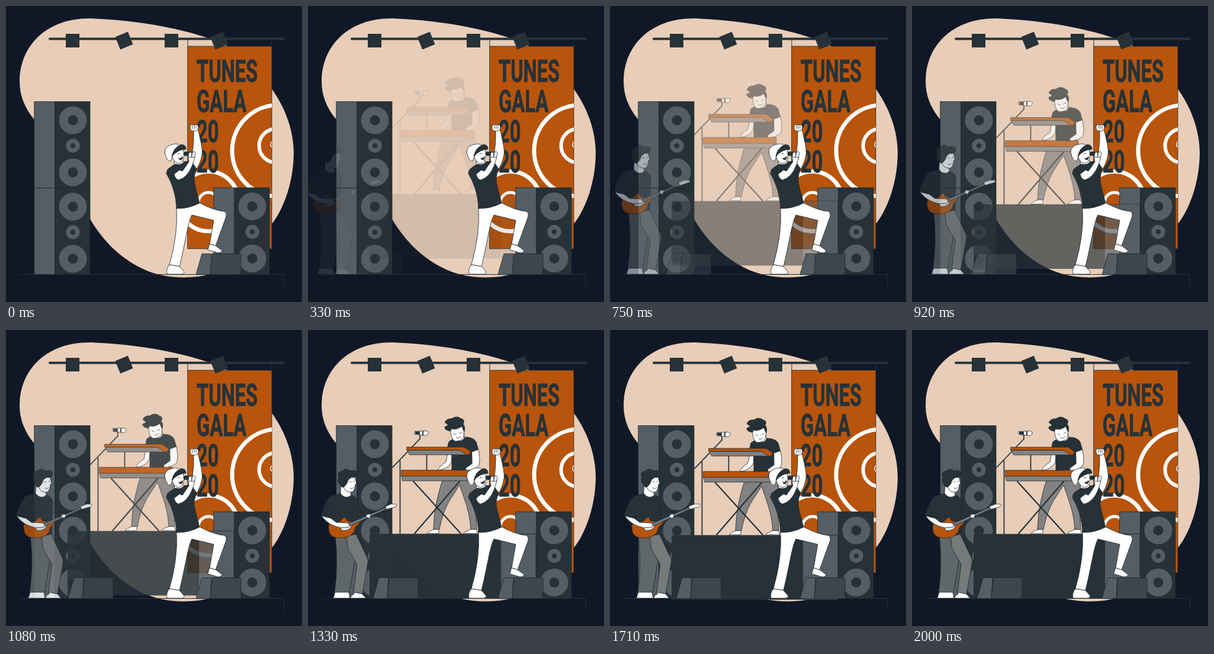
Animation, 500 px wide and 500 px high, one loop 2040 ms. Source, as an HTML page:

```html
<!DOCTYPE html>
<html lang="en">
<head>
<meta charset="utf-8">
<title>Stage</title>
<style>
html, body { margin: 0; width: 100%; height: 100%; overflow: hidden; background: #101827; }
svg { display: block; width: 100vw; height: 100vh; }
.dark { fill: #263238; }
.side { fill: #545e64; }
.front { fill: #3c464c; }
.slab { fill: #828282; }
.orange { fill: #b8540b; }
.white { fill: #fff; }
.edge { stroke: #1b262c; stroke-width: .8; stroke-linejoin: round; stroke-linecap: round; }
.line { fill: none; stroke: #263238; stroke-linecap: round; }
.ring { fill: none; stroke: #fff; }
.poster { font: 700 51px Roboto, "Liberation Sans", sans-serif; fill: #263238; stroke: #263238; stroke-width: .8; }
</style>
</head>
<body>
<svg viewBox="0 0 500 500">
  <defs>
    <clipPath id="bannerClip"><path d="M307 68H449V410H307Z"/></clipPath>
    <g id="box">
      <path class="side edge" d="M0 0H35V146H0Z"/>
      <path class="dark edge" d="M35 0H94V146H35Z"/>
      <g fill="none" stroke="#545e64">
        <circle cx="65" cy="31.500" r="16" stroke-width="15"/>
        <circle cx="65" cy="74.500" r="8" stroke-width="7.500"/>
        <circle cx="65" cy="119.500" r="16" stroke-width="15"/>
      </g>
    </g>
    <g id="monitor" class="edge">
      <path class="side" d="M0 36L10 1H26L24 36Z"/>
      <path class="front" d="M24 36L27 1H76V36Z"/>
    </g>
  </defs>

  <path fill="#e8cdb8" d="M23 128C23 62 76 16 152 21.500C230 25 298 39 350 57C400 76 430 108 449 140C473 174 486 212 486 248C486 298 468 345 449 368C420 402 378 450 325 457C290 461 255 457 225 441C185 420 160 390 142 360C100 270 85 230 48 192C31 172 23 150 23 128Z"/>
  <path class="line" d="M24 453.500H469V474"/>

  <!-- banner -->
  <path class="line" d="M307 56V68M449 56V68"/>
  <path class="orange edge" d="M307 68H449V410H307Z"/>
  <g class="ring" clip-path="url(#bannerClip)">
    <circle cx="459" cy="244.500" r="77" stroke-width="7"/>
    <circle cx="456" cy="236" r="28.500" stroke-width="6"/>
    <circle cx="453" cy="234" r="6" stroke-width="1.500"/>
    <circle cx="342" cy="330" r="50.500" stroke-width="7"/>
    <circle cx="342" cy="332" r="17" stroke-width="5"/>
  </g>
  <g class="poster" transform="translate(322 128) scale(.64 1)">
    <text>TUNES</text>
    <text y="51">GALA</text>
    <text y="102">20</text>
    <text y="153">20</text>
  </g>

  <!-- lights -->
  <path class="line" stroke-width="4" d="M74 55.500H469"/>
  <g class="dark">
    <path d="M101 47h23v23h-23zM268 47h23v23h-23z"/>
    <path d="M-11.500 -11.500h23v23h-23z" transform="translate(199.500 58.500) rotate(-22)"/>
    <path d="M-11.500 -11.500h23v23h-23z" transform="translate(360 58.500) rotate(-22)"/>
  </g>

  <use href="#box" x="48" y="161.500"/>
  <use href="#box" x="48" y="307.500"/>
  <use href="#box" x="351" y="307"/>

  <!-- riser, keyboard player -->
  <g id="riser">
    <path class="side edge" d="M326 344.500H385V453.500H326Z"/>
    <path class="dark" d="M104 344.500H326V453.500H104Z"/>
    <path class="line" stroke-width="1.800" d="M155.500 221V344M143 232L189 184V177"/>
    <path class="white edge" d="M181 171.500L199 170.500Q204 171 203 174.500Q202 179 198 178.500L181 176.500Q177 174 181 171.500Z"/>
    <path class="dark" d="M181 172l8 -.5v5.500l-8 -1zM193 171h2v7h-2z"/>

    <g class="edge">
      <path class="slab" d="M232 240L278 236Q288 265 283 296L285 337H275Q274 312 263 282L256 262L238 290Q227 310 222 337H212Q213 290 232 240Z"/>
      <path class="white" d="M213 337H221V344H201Q202 341 213 337ZM275 337H284L287 344H262Q264 341 275 337Z"/>
      <path class="white" d="M245 176L263 172L265 188L253 194L245 187Z"/>
      <path class="dark" d="M238 189Q247 181 252 187Q261 190 265 181Q279 181 284 189L288 203L278 207V238H243V212L234 208Z"/>
      <path class="white" d="M243 209L242 224Q235 236 219 237Q222 230 233 223L236 208Z"/>
      <path class="white" d="M277 206L288 202Q292 222 288 230Q280 237 266 238L267 233L277 226Z"/>
      <path class="white" d="M241 166Q240 184 248 188Q259 189 263 180L264 162L247 158Z"/>
      <path class="dark" d="M240 171Q230 169 231 164L237 161L231 156Q235 149 243 150Q251 144 259 150Q266 152 262 159Q266 164 264 172Q261 168 260 163Q249 170 243 167Z"/>
      <path class="line" d="M246 175l4 2M256 175l4 -2M251 182q4 2 7 -2"/>
    </g>
    <path class="line" stroke-width="2.200" d="M178 256L258 344M256 256L180 344"/>
    <path class="line" stroke-width="1.800" d="M200.500 211V237M263 211V237"/>
    <g class="edge">
      <path class="slab" d="M158 246H280L270 255H160Z"/>
      <path class="orange" d="M158 237H281V247H158Z"/>
      <path class="slab" d="M168 203H257L269 211H172Z"/>
      <path class="orange" d="M167 198H264L275 206L272 211H268L256 203H167Z"/>
    </g>
  </g>

  <!-- guitarist -->
  <g id="guitarist">
    <use href="#monitor" x="110" y="417.500"/>
    <g class="edge">
      <path fill="#60676b" d="M46 345H72L79 390L70 444H45Q52 395 46 345Z"/>
      <path fill="#777a7b" d="M65 346L81 344L98 380Q103 387 101 396L92 446L77 443L83 396L68 370Z"/>
      <path class="white" d="M46 443H69L71 453H43ZM78 443L92 446L98 453H72Q72 449 78 446Z"/>
      <path class="white" d="M56 262L71 265L73 282Q63 288 55 279Z"/>
      <path class="dark" d="M22 313Q30 288 38 281L55 276Q63 287 74 279Q82 281 84 291L82 345Q61 350 45 345L42 318Z"/>
      <path class="white" d="M58 254Q59 270 67 273Q77 277 79 267L80 261L82 259L79 247L66 246Z"/>
      <path class="dark" d="M62 264Q58 268 55 262Q49 257 52 249Q48 240 58 238Q65 232 71 238Q83 235 84 243Q83 250 74 249Q67 252 66 259Z"/>
      <path class="line" d="M70 256l3 1M77 256l2 0M71 267q4 2 6 -1"/>
      <path class="orange" d="M35 336Q33 325 44 325Q54 326 59 318Q66 314 65 321Q72 326 83 321Q91 319 86 328Q78 333 78 341Q70 353 52 351Q36 351 35 336Z"/>
      <path fill="#e5e2df" d="M54 333Q66 325 74 331Q70 340 58 339Z"/>
      <path class="white" d="M23 314L39 318L48 325L68 326Q74 329 69 333L55 334Q34 330 23 314Z"/>
      <path fill="#737b80" d="M69 327L133 299L134 302L71 331Z"/>
      <path class="white" d="M98 314Q101 309 107 312L104 318Q99 318 98 314Z"/>
      <path class="white" d="M131 298L141 294L149 294Q153 297 147 299L133 303Z"/>
    </g>
  </g>

  <!-- singer -->
  <use href="#monitor" x="321" y="417.500"/>
  <g class="edge">
    <path class="white" d="M288 341L326 332Q352 346 369 347Q374 350 371 358L354 405L344 402L351 362L314 353C307 366 303 400 293 440L276 437Q291 385 288 341Z"/>
    <path class="white" d="M276 437L293 440L301 449Q301 453 296 453H272Q270 444 276 437ZM344 402L354 405L365 413Q364 417 358 417L341 412Z"/>
    <path class="white" d="M308 270Q318 251 317 209L324 208Q333 242 331 251Q329 266 319 280Z"/>
    <path class="white" d="M311 203Q312 199 317 201Q324 199 325 204Q325 210 321 211H314Q310 208 311 203Z"/>
    <path class="line" d="M315 202v5M318 202v5M321 202v5"/>
    <path class="white" d="M284 259L300 262L301 272L286 276Z"/>
    <path class="dark" d="M273 276Q281 269 287 267Q295 270 301 263L313 262L322 275Q315 291 320 306L327 333Q307 343 288 342Q287 310 271 283Z"/>
    <path class="white" d="M280 251Q281 263 291 266Q299 265 300 256L301 250L298 240L285 243Z"/>
    <path class="white" d="M268 247Q268 237 280 234Q290 231 295 236L283 250L278 262Q272 264 268 247Z"/>
    <path class="dark" d="M280 254Q283 239 296 234Q304 234 304 242Q291 242 280 254Z"/>
    <path class="dark" d="M292 257Q296 258 298 254Q299 260 294 260Z"/>
    <path class="line" d="M290 250q2 -2 4 0"/>
    <path class="white" d="M284 284L293 277L298 279L309 263L307 252L314 247L319 255L315 268Q307 290 291 294Q285 291 284 284Z"/>
    <path class="dark" d="M300 250Q300 245 306 246.500L318 247V250L306 252.500Q301 254 300 250Z"/>
    <path class="white" d="M309 248Q313 245 314 249L313 256L308 255Z"/>
    <path class="white" d="M315 247Q319 244 320 249L318 256L314 255Z"/>
  </g>
</svg>
<script>
const LOOP = 2040, SLIDE = 2000, SHIFT = 30, LEAD = 15, HOLD = 165;
const riser = document.getElementById("riser");
const guitarist = document.getElementById("guitarist");

const bezier = (a, b, u) => 3 * u * (1 - u) ** 2 * a + 3 * u * u * (1 - u) * b + u ** 3;

// cubic-bezier(.36, -.01, .5, 1.38), solved by bisection
function ease(x) {
  let lo = 0, hi = 1;
  for (let i = 0; i < 24; i++) {
    const mid = (lo + hi) / 2;
    if (bezier(.36, .5, mid) < x) lo = mid; else hi = mid;
  }
  return bezier(-.01, 1.38, hi);
}

function draw(now) {
  const t = now % LOOP;
  const p = t < HOLD ? 0 : ease(Math.min(1, (t + LEAD) / SLIDE));
  const offset = (p - 1) * SHIFT;
  const opacity = Math.max(0, Math.min(1, p));
  riser.setAttribute("transform", `translate(0 ${offset})`);
  guitarist.setAttribute("transform", `translate(${offset} 0)`);
  riser.setAttribute("opacity", opacity);
  guitarist.setAttribute("opacity", opacity);
}

const start = performance.now();
function tick() {
  draw(performance.now() - start);
  requestAnimationFrame(tick);
}
tick();
</script>
</body>
</html>
```
